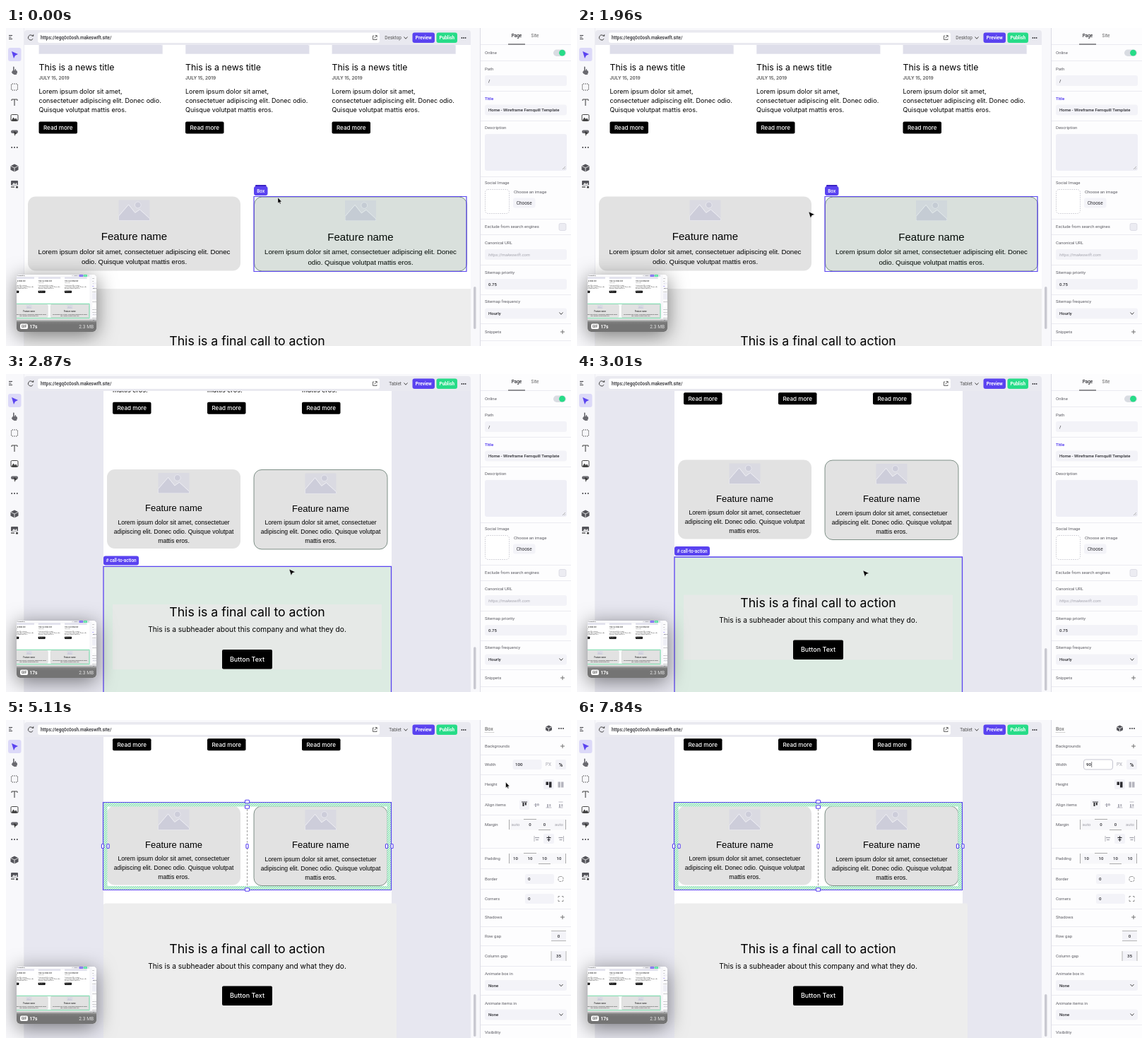
Write an HTML page with a canvas that moves like this. It is 800 px wide and 450 px high and loops after 8 s.

```html
<!DOCTYPE html>
<html lang="en">
<head>
<meta charset="utf-8">
<title>Page builder</title>
<style>
html, body { margin: 0; width: 100%; height: 100%; overflow: hidden; background: #fff; }
canvas { display: block; width: 800px; height: 450px; }
</style>
</head>
<body>
<canvas id="stage" width="800" height="450"></canvas>
<script>
const c = document.getElementById('stage').getContext('2d');
const LOOP = 8000;
const PURPLE = '#5a43f0', GREEN = '#27dc88', INK = '#2c2c31', SOFT = '#5c5c63';
const LINE = '#e7e7ee', FIELD = '#f3f3f8', CHROME = '#f8f8fb';
const UI = 'Roboto, sans-serif', PAGE = 'Inter, sans-serif', PLAIN = '"Liberation Sans", Arial, sans-serif';

function rect(x, y, w, h, fill, r = 0, stroke, lw = 1) {
  c.beginPath();
  c.roundRect(x, y, w, h, r);
  if (fill) { c.fillStyle = fill; c.fill(); }
  if (stroke) { c.strokeStyle = stroke; c.lineWidth = lw; c.stroke(); }
}
function circle(x, y, r, fill, stroke, lw = 1) {
  c.beginPath();
  c.arc(x, y, r, 0, Math.PI * 2);
  if (fill) { c.fillStyle = fill; c.fill(); }
  if (stroke) { c.strokeStyle = stroke; c.lineWidth = lw; c.stroke(); }
}
function path(points, fill, stroke, lw = 1) {
  c.beginPath();
  for (let i = 0; i < points.length; i += 2) c.lineTo(points[i], points[i + 1]);
  if (fill) { c.closePath(); c.fillStyle = fill; c.fill(); }
  if (stroke) { c.strokeStyle = stroke; c.lineWidth = lw; c.stroke(); }
}
function text(s, x, y, size, family = UI, color = '#000', align = 'left', style = '400') {
  c.font = `${style} ${size}px ${family}`;
  c.fillStyle = color;
  c.textAlign = align;
  c.textBaseline = 'alphabetic';
  c.fillText(s, x, y + size * 0.36);
}
function at(x, y, draw) {
  c.save();
  c.translate(x, y);
  draw();
  c.restore();
}
function dots(x, y, gap = 3) {
  for (let i = -1; i <= 1; i++) circle(x + i * gap, y, 0.9, INK);
}
function plus(x, y) {
  path([x - 3, y, x + 3, y], null, '#555', 0.8);
  path([x, y - 3, x, y + 3], null, '#555', 0.8);
}
const chevron = (x, y) => path([x - 2.5, y - 1.5, x, y + 1.3, x + 2.5, y - 1.5], null, '#444', 1);
function cube(x, y, s) {
  path([x, y - s, x + s, y - s / 2, x + s, y + s / 2, x, y + s, x - s, y + s / 2, x - s, y - s / 2], '#55555b');
  path([x - s, y - s / 2, x, y, x + s, y - s / 2], null, '#fff', 0.8);
  path([x, y, x, y + s], null, '#fff', 0.8);
}

// Page content
function picture(x, y, w, h, back, shape) {
  c.save();
  rect(x, y, w, h, back);
  c.clip();
  const peaks = [0, h, 0, h * 0.78, w * 0.32, h * 0.22, w * 0.53, h * 0.62, w * 0.68, h * 0.46, w, h * 0.9, w, h];
  circle(x + w * 0.62, y + h * 0.24, h * 0.15, shape, '#f4f4f8', 0.6);
  at(x, y, () => path(peaks, shape, '#f6f6fa', 0.8));
  c.restore();
}
function button(x, y, w, h, label, size) {
  rect(x, y, w, h, '#000', 2);
  text(label, x + w / 2, y + h / 2, size, PAGE, '#fff', 'center', '500');
}
function newsCard(x, y, lines, gap) {
  text('This is a news title', x, y + 0.6, 12.3, PAGE);
  text('JULY 15, 2019', x, y + 15.3, 6.4, PAGE, '#666', 'left', '700');
  lines.forEach((s, i) => text(s, x, y + 35 + i * gap, 9, PAGE));
  button(x, y + 51.5 + (lines.length - 1) * gap, 54.5, 17, 'Read more', 8.1);
}
function feature(x, y, w, h, d, outlined) {
  rect(x, y, w, h, '#e2e2e2', 11, outlined ? '#61786d' : null, 0.8);
  const mid = x + w / 2;
  picture(mid - 22, y + 5, 44, 29, '#dadae2', '#cdcdda');
  text('Feature name', mid, y + d.nameY, d.nameSize, PLAIN, '#000', 'center');
  d.lines.forEach((s, i) => text(s, mid, y + d.bodyY + i * d.gap, d.size, PLAIN, '#000', 'center'));
}
function tag(x, y, w, label) {
  rect(x + 2, y - 2, w - 4, 3, '#3a22c4', 1);
  rect(x, y, w, 13, PURPLE, 3);
  text(label, x + w / 2, y + 6.5, 6.4, UI, '#fff', 'center', '500');
}

const WIDE_NEWS = ['Lorem ipsum dolor sit amet,', 'consectetuer adipiscing elit. Donec odio.', 'Quisque volutpat mattis eros.'];
const SLIM_NEWS = ['Lorem ipsum dolor sit', 'amet, consectetuer', 'adipiscing elit. Donec', 'odio. Quisque volutpat', 'mattis eros.'];
const WIDE_BOX = { nameY: 56.3, nameSize: 15, bodyY: 77.8, gap: 14.5, size: 9.7,
  lines: ['Lorem ipsum dolor sit amet, consectetuer adipiscing elit. Donec', 'odio. Quisque volutpat mattis eros.'] };
const SLIM_BOX = { nameY: 54.6, nameSize: 13, bodyY: 74.5, gap: 13, size: 8.65,
  lines: ['Lorem ipsum dolor sit amet, consectetuer', 'adipiscing elit. Donec odio. Quisque volutpat', 'mattis eros.'] };

function inBrowser(draw) {
  c.save();
  c.beginPath();
  c.rect(26, 24, 632, 426);
  c.clip();
  draw();
  c.restore();
}
function desktopPage() {
  rect(26, 24, 632, 426, '#fff');
  for (const x of [46.5, 254, 461.5]) {
    picture(x, -80, 175.5, 117, '#e7e7f0', '#dedeea');
    newsCard(x, 55, WIDE_NEWS, 13);
  }
  feature(31, 238.5, 301, 105, WIDE_BOX);
  feature(351.5, 239, 301, 105, WIDE_BOX, true);
  rect(26, 369, 632, 81, '#ededed');
  text('This is a final call to action', 341.5, 443, 17.7, PAGE, '#000', 'center');
}
function tabletPage(scroll, ctaHover, selected) {
  rect(26, 24, 632, 426, '#e7e7f0');
  rect(138, 24, 408, 426, '#fff');
  at(0, -scroll, () => {
    for (const x of [151, 285, 419]) {
      picture(x, 52, 113, 75, '#e7e7f0', '#dcdce6');
      newsCard(x, 145, SLIM_NEWS, 12.8);
    }
    feature(143, 343, 189, 112, SLIM_BOX);
    feature(351, 343.5, 189, 112.5, SLIM_BOX, true);
    if (ctaHover) {
      rect(138, 480.5, 407.5, 220, '#dcebe2', 0, PURPLE, 1.3);
      rect(151, 534, 381, 92, '#e6e9e7');
    } else {
      rect(138, 481, selected ? 415 : 408, 220, '#ededed', selected ? 3 : 0);
    }
    text('This is a final call to action', 341.5, 544.8, 17.7, PAGE, '#000', 'center');
    text('This is a subheader about this company and what they do.', 341.5, 569.8, 10.2, PAGE, '#000', 'center');
    button(306, 598, 71, 27.5, 'Button Text', 9);
  });
  if (ctaHover) {
    rect(138, 480 - scroll - 14.5, 50, 13, PURPLE, 3);
    text('# call-to-action', 163, 480 - scroll - 8, 6.4, UI, '#fff', 'center', '500');
  }
}
function boxSelection() {
  c.save();
  c.beginPath();
  c.rect(138, 117, 407, 123);
  c.rect(143.5, 122.5, 396, 112.5);
  c.clip('evenodd');
  rect(138, 117, 407, 123, '#d3f3e2');
  for (let x = 10; x < 550; x += 3) path([x, 241, x + 125, 116], null, '#74dca6', 0.9);
  c.restore();
  rect(137.5, 116.5, 408, 124, null, 0, PURPLE, 1.2);
  c.setLineDash([3, 2]);
  path([341.5, 126, 341.5, 234], null, '#777', 0.7);
  c.setLineDash([]);
  for (const y of [115.5, 123, 240]) rect(338.5, y - 2.2, 6, 4.5, '#fff', 1, PURPLE, 1.1);
  for (const x of [137, 144.5, 341.5, 539, 546.5]) rect(x - 1.6, 175.5, 3.2, 6, '#fff', 1, PURPLE, 1.1);
}

// Editor chrome
function toolbar() {
  rect(0, 0, 26, 450, CHROME);
  path([25.5, 0, 25.5, 450], null, LINE, 0.7);
  [10.5, 13, 15.5].forEach((y, i) => path([4, y, i === 1 ? 7.5 : 9, y], null, INK, 0.9));
  rect(3, 28, 18.5, 19, '#dcd9f8', 3);
  path([8, 33, 17, 37, 13, 39, 11, 43], PURPLE);
  rect(8.5, 60, 7.5, 5, '#6a6a70', 2);
  rect(10, 54.5, 1.6, 8, '#6a6a70', 1);
  rect(12.5, 58, 1.6, 5, '#6a6a70', 1);
  path([8, 62, 11, 65.5, 15, 65.5], null, '#6a6a70', 1);
  c.setLineDash([1.5, 1.3]);
  rect(7.5, 79, 9, 9, null, 1, '#444', 1);
  c.setLineDash([]);
  path([8, 103, 8, 101, 16, 101, 16, 103], null, '#444', 1);
  path([12, 101, 12, 110], null, '#444', 1.1);
  rect(7, 122.5, 10, 9, null, 1.5, '#444', 1);
  path([7.5, 131, 10.5, 126.5, 12.5, 129, 14, 127.5, 16.5, 131], '#444');
  rect(7, 144.5, 10, 4.5, '#6a6a70', 2);
  path([11, 146, 16, 149, 13.5, 150, 12.5, 153], '#333');
  dots(12, 169, 3.8);
  cube(12, 198, 5.5);
  rect(7, 216, 10, 6.5, '#55555b', 1);
  path([8.5, 222, 11, 219, 13, 221, 15, 219, 16, 222], '#eee');
  path([7, 225, 12, 225], null, '#444', 1.3);
  rect(14, 224, 3, 2.5, '#444');
}
function topBar(device) {
  rect(26, 0, 632, 24, CHROME);
  rect(26, 3, 632, 21, '#e9e9f0', [4, 4, 0, 0]);
  c.beginPath();
  c.arc(35, 13.5, 3.6, 0.5, 5.4);
  c.strokeStyle = '#444';
  c.lineWidth = 1;
  c.stroke();
  path([36.2, 11.8, 39.2, 11.8, 39.2, 8.8], '#444');
  rect(45, 6.5, 484, 14.5, '#fff', 3);
  text('https://iegq0c0osh.makeswift.site/', 49, 13.7, 6.4, UI, INK, 'left', '500');
  path([521, 11, 519.5, 11, 519.5, 16.5, 525, 16.5, 525, 15], null, '#444', 0.8);
  path([522.5, 10.5, 525.2, 10.5, 525.2, 13.2], null, '#444', 0.8);
  path([521.5, 14.5, 525, 10.8], null, '#444', 0.8);
  text(device, 560, 13.7, 6.5, UI, '#555', 'right');
  chevron(566, 14);
  rect(575.5, 6.5, 31.5, 14.5, PURPLE, 3);
  text('Preview', 591.3, 13.7, 6.4, UI, '#fff', 'center', '700');
  rect(609.5, 6.5, 29.5, 14.5, GREEN, 3);
  text('Publish', 624.3, 13.7, 6.4, UI, '#fff', 'center', '700');
  dots(648, 14, 2.6);
}

const separators = (ys) => ys.forEach(y => path([672, y + 0.5, 800, y + 0.5], null, LINE, 0.8));
const label = (s, y, color = SOFT, style = '400') => text(s, 678, y, 6, UI, color, 'left', style);
function input(s, y, color = INK, style = '500') {
  rect(678, y, 116, 15, FIELD, 3);
  text(s, 683, y + 7.5, 6, UI, color, 'left', style);
}
function select(s, y) {
  input(s, y);
  chevron(786, y + 7.5);
}
function panelBack() {
  rect(658, 0, 14, 450, CHROME);
  rect(671, 0, 129, 450, '#fdfdfe');
  path([671.5, 0, 671.5, 450], null, '#dcdce4', 1);
}
function pagePanel() {
  panelBack();
  text('Page', 723, 11, 6.4, UI, INK, 'center', '500');
  text('Site', 749, 11, 6.4, UI, '#666', 'center');
  separators([23, 46, 89, 131, 210, 270, 292, 335, 377, 418, 442]);
  path([711, 23, 735, 23], null, INK, 1);
  label('Online', 35);
  rect(775, 30.5, 18, 9.5, '#d9dce2', 5);
  circle(787.5, 35.2, 4.4, GREEN);
  label('Path', 58);
  input('/', 67);
  label('Title', 100, PURPLE, '700');
  input('Home - Wireframe Fernquill Template', 108.5);
  label('Description', 141);
  rect(678, 150, 116, 52, '#efeff6', 3);
  path([788, 200, 792, 196], null, '#888', 0.6);
  path([790.5, 200, 792, 198.5], null, '#888', 0.6);
  label('Social Image', 219);
  c.setLineDash([1.5, 1.5]);
  rect(678.5, 228.5, 34, 34, '#fff', 4, '#bbbbc6', 0.8);
  c.setLineDash([]);
  text('Choose an image', 719, 232, 6, UI, SOFT);
  rect(718, 240.5, 31.5, 14, FIELD, 3);
  text('Choose', 733.7, 247.5, 6.4, UI, INK, 'center');
  label('Exclude from search engines', 281);
  rect(783, 276.5, 10, 10, '#ececf2', 2, '#d5d5df', 0.7);
  label('Canonical URL', 304);
  input('https://makeswift.com', 313, '#a5a5ae', 'italic 400');
  label('Sitemap priority', 346);
  input('0.75', 355);
  label('Sitemap frequency', 387);
  select('Hourly', 396.5);
  label('Snippets', 430);
  plus(788, 430);
}
function alignIcon(x, y, on, mode) {
  const color = on ? INK : '#b5b5be';
  if (on) rect(x - 7, y - 7, 14, 14, FIELD, 2);
  if (mode < 3) path([x - 4, y - 4 + mode * 4, x + 4, y - 4 + mode * 4], null, color, 0.9);
  else [-4, 4].forEach(d => path([x - 3, y + d, x + 3, y + d], null, color, 0.9));
  rect(x - 2.5, y - 3 + Math.min(mode, 2), 2, 5, color);
  rect(x + 0.8, y - 3 + Math.min(mode, 2), 2, 3.5, color);
}
function spacing(values, y) {
  rect(712, y - 7.5, 81, 15, '#f7f7fa', 2);
  values.forEach((v, i) => text(v, 721.5 + i * 20.5, y, 6, UI, v === 'auto' ? '#b0b0b8' : INK, 'center', '500'));
  path([712.5, y - 7, 712.5, y + 7], null, '#888', 0.7);
  path([792.5, y - 7, 792.5, y + 7], null, '#888', 0.7);
  path([733, y - 7.5, 751, y - 7.5], null, '#888', 0.7);
  path([754, y + 7.5, 771, y + 7.5], null, '#888', 0.7);
}
function widthField(t) {
  const focused = t >= 6860, hover = t >= 6350;
  const value = t < 7420 ? '100' : t < 7560 ? '' : t < 7770 ? '9' : '90';
  rect(717.5, 56, 41, 14, focused ? '#fff' : FIELD, 3, hover ? '#b9b9c6' : null, 0.8);
  if (focused && value === '100') rect(720.5, 58.5, 11, 9, '#b9d6fb');
  text(value, 721, 63, 6.2, UI, INK, 'left', '500');
  if (t >= 7420) rect(721.5 + c.measureText(value).width, 59, 0.6, 8, INK);
}
function boxPanel(t) {
  panelBack();
  text('Box', 678, 12, 7, UI, '#555');
  c.setLineDash([1, 1]);
  path([678, 17.5, 691, 17.5], null, '#888', 0.7);
  c.setLineDash([]);
  cube(768.5, 12, 4.5);
  dots(786, 12);
  separators([23, 49, 77, 105, 134, 181, 210, 239, 267, 292, 319, 348, 389, 431]);
  const rows = { Backgrounds: 37, Width: 63, Height: 91, 'Align items': 120, Margin: 148, Padding: 196, Border: 225,
    Corners: 253, Shadows: 279, 'Row gap': 305.5, 'Column gap': 334, 'Animate box in': 359, 'Animate items in': 400.5, Visibility: 441.5 };
  for (const name in rows) label(name, rows[name]);
  plus(788, 37);
  plus(788, 279);
  widthField(t);
  text('PX', 768, 63, 6.4, UI, '#a7a7b0', 'center');
  rect(778, 56, 15, 14, FIELD, 2);
  text('%', 785.5, 63, 7.5, UI, INK, 'center', '700');
  rect(761, 84, 15, 14, FIELD, 2);
  rect(764.5, 87.5, 3.5, 4.5, INK);
  rect(769, 87.5, 3.5, 8, INK);
  rect(781.5, 87.5, 3.5, 8, '#b5b5be');
  rect(786, 87.5, 3.5, 8, '#b5b5be');
  [734, 751.5, 768.5, 785.5].forEach((x, i) => alignIcon(x, 120, i === 0, i));
  spacing(['auto', '0', '0', 'auto'], 148);
  rect(761, 161, 15, 14, FIELD, 2);
  [752, 768.5, 785.5].forEach((x, i) => {
    const color = i === 1 ? INK : '#a5a5ae';
    path([x - 4 + i * 4, 164, x - 4 + i * 4, 172], null, color, 0.8);
    path([x - 3, 166.5, x + 3, 166.5], null, color, 1.3);
    path([x - 2, 169.5, x + 2, 169.5], null, color, 1.3);
  });
  spacing(['10', '10', '10', '10'], 196);
  for (const y of [225, 253]) {
    rect(735, y - 7, 41, 14, FIELD, 3);
    text('0', 739, y, 6.2, UI, INK, 'left', '500');
    c.setLineDash(y < 240 ? [3, 1] : [2, 3, 2, 0]);
    rect(782, y - 3.5, 7, 7, null, y < 240 ? 2.5 : 0, '#777', 0.8);
    c.setLineDash([]);
  }
  [['0', 305.5], ['35', 334]].forEach(([s, y]) => {
    rect(772, y - 7, 21, 14, FIELD, 2);
    text(s, 782.5, y, 6.2, UI, INK, 'center', '500');
  });
  for (const y of [298.5, 312.5]) path([772, y, 793, y], null, '#999', 0.7);
  for (const x of [772, 793]) path([x, 327, x, 341], null, '#999', 0.7);
  select('None', 368);
  select('None', 409.5);
}
function scrollThumb(y) {
  rect(662, y, 3.5, 60, '#c9c9d1', 2);
}
function desktopScene() {
  rect(0, 0, 800, 450, CHROME);
  inBrowser(desktopPage);
  topBar('Desktop');
  toolbar();
  pagePanel();
  scrollThumb(366);
}
function clipCard() {
  c.save();
  c.shadowColor = 'rgba(0,0,0,.5)';
  c.shadowBlur = 28;
  c.shadowOffsetY = 5;
  rect(15, 349, 113, 81, '#fff', 5);
  c.restore();
  c.save();
  rect(15, 349, 113, 81, '#fff', 5);
  c.clip();
  at(0, 348, () => {
    c.scale(0.18, 0.18);
    desktopScene();
    rect(28, 235, 628, 113, null, 0, '#5ed39a', 5);
  });
  const shade = c.createLinearGradient(0, 411, 0, 420);
  shade.addColorStop(0, 'rgba(110,110,110,0)');
  shade.addColorStop(0.6, '#7d7d7d');
  shade.addColorStop(1, '#747474');
  rect(15, 411, 113, 19, shade);
  c.restore();
  rect(20, 418.5, 11, 7.5, '#fff', 2);
  text('GIF', 25.5, 422.3, 5, UI, '#666', 'center', '700');
  text('17s', 33.5, 422.3, 6.6, UI, '#fff', 'left', '700');
  text('2.3 MB', 124, 422.3, 6.6, UI, '#e4e4e4', 'right');
}

// Pointer motion
const ROUTE = [[0, 385, 240], [840, 328, 260], [2100, 328, 260], [2400, 360, 258], [2520, 360, 258], [2950, 405, 278],
  [3220, 405, 278], [3900, 343, 234], [4200, 343, 234], [5400, 770, 63], [6160, 770, 63], [6520, 750, 63], [6720, 738, 63]];
const ease = k => { k = Math.max(0, Math.min(1, k)); return k * k * (3 - 2 * k); };
function pointerAt(t) {
  const i = ROUTE.findIndex(p => p[0] > t);
  if (i < 0) return ROUTE[ROUTE.length - 1].slice(1);
  const [t0, x0, y0] = ROUTE[i - 1], [t1, x1, y1] = ROUTE[i];
  const k = ease((t - t0) / (t1 - t0));
  return [x0 + (x1 - x0) * k, y0 + (y1 - y0) * k];
}
function resizePointer(color) {
  path([-6, 0, -2.5, -3, -2.5, -0.8, 2.5, -0.8, 2.5, -3, 6, 0, 2.5, 3, 2.5, 0.8, -2.5, 0.8, -2.5, 3], color);
}
function pointer(t) {
  if (t >= 6860) return;
  const [x, y] = pointerAt(t);
  at(x, y, () => {
    if (t >= 3880 && t < 4250) {
      if (t >= 3990) circle(0, 0, 12, 'rgba(90,150,230,.18)', '#6da3e3', 1.3);
      c.rotate(Math.PI / 2);
      resizePointer('#15543b');
    } else if (t > 5000 && x < 758 && y < 75) {
      resizePointer('#000');
    } else if (t < 420 || x > 671) {
      path([0, 0, 0, 8, 1.8, 6.4, 3, 9, 4.2, 8.5, 3, 6, 5.3, 5.8, 0, 0], '#000', '#fff', 0.4);
    } else {
      path([0, 0, 8.5, 4, 4.6, 5.3, 2.8, 9], '#000', '#fff', 0.4);
    }
  });
}

function draw(t) {
  c.clearRect(0, 0, 800, 450);
  if (t < 2100) {
    desktopScene();
    rect(351, 238.5, 301, 106, 'rgba(40,170,100,.05)', 0, PURPLE, 1.2);
    tag(351, 224, 19.5, 'Box');
  } else {
    const k = ease((t - 2480) / 460);
    const selected = t >= 3990;
    rect(0, 0, 800, 450, CHROME);
    inBrowser(() => tabletPage(221.5 * k, t >= 2870 && t < 3500, selected));
    if (t >= 2240 && t < 2520) {
      rect(285.5, 52.5, 112.5, 213, null, 0, PURPLE, 1.2);
      tag(285, 38, 19.5, 'Box');
    }
    if (selected) boxSelection();
    topBar('Tablet');
    toolbar();
    if (selected) boxPanel(t);
    else pagePanel();
    scrollThumb(358 + 30 * k);
    if (t >= 5600 && t < 6720) {
      rect(755, 38, 27, 15, '#78787d', 2.5);
      text('Pixels', 768.5, 45.5, 6.4, UI, '#fff', 'center', '500');
    }
  }
  clipCard();
  pointer(t);
}
function tick() {
  draw(performance.now() % LOOP);
  requestAnimationFrame(tick);
}
tick();
</script>
</body>
</html>
```
